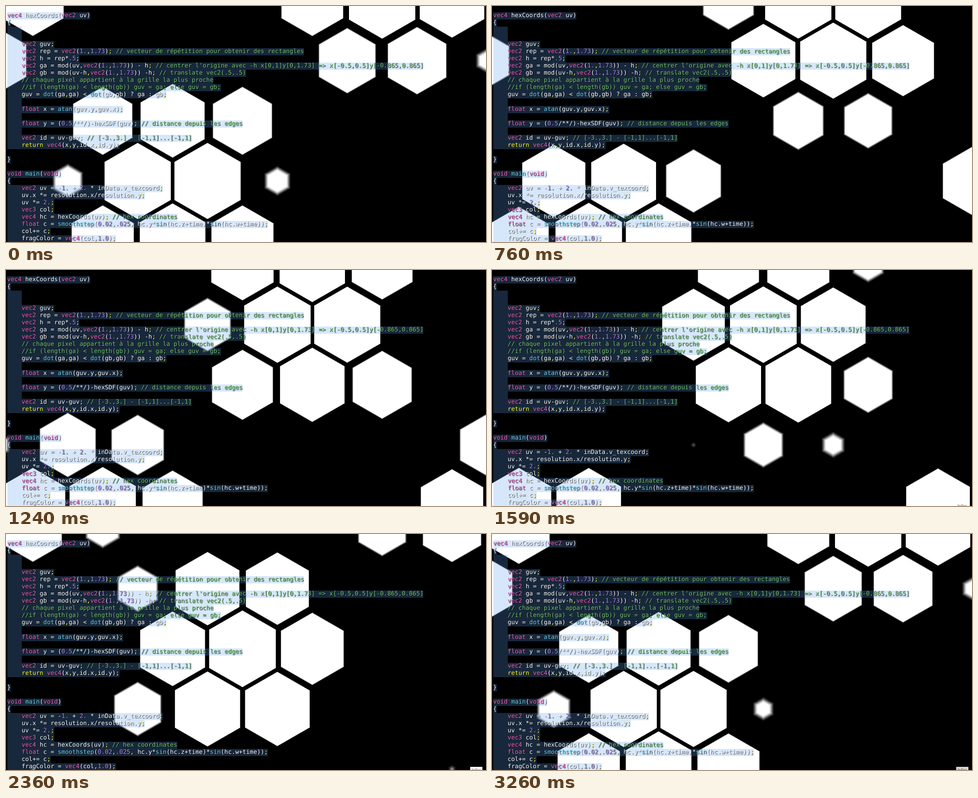
Animation of 1065x526 px, one loop 3330 ms. Source, as an HTML page with a canvas:

```html
<!DOCTYPE html>
<html lang="fr">
<head>
<meta charset="utf-8">
<style>
html, body { margin: 0; width: 100%; height: 100%; overflow: hidden; background: #000; }
canvas { position: absolute; left: 0; top: 0; }
pre {
  position: absolute; left: 2.5px; top: 13.9px; margin: 0;
  font: 13.35px/16.06px "DejaVu Sans Mono", monospace;
  text-rendering: geometricPrecision;
  color: #fff; text-shadow: 1px 1px 1px rgba(0, 0, 0, .85);
}
pre div { width: max-content; height: 16.06px; background: rgba(96, 160, 240, .25); }
.type { color: #f862bb; }
.func { color: #6ad4ec; }
.mark { color: #ffff40; }
.num { color: #b488ee; }
.note { color: #74c46c; }
#tip {
  position: absolute; left: 1030px; top: 519px; width: 27px; height: 7px;
  overflow: hidden; background: #fff; color: #555; text-align: center;
  font: 9px/14px "DejaVu Sans", sans-serif;
}
</style>
</head>
<body>
<canvas width="1065" height="526"></canvas>
<pre>
vec4 hexCoords(vec2 uv)
{
    
    
    vec2 guv;
    vec2 rep = vec2(1.,1.73); // vecteur de répétition pour obtenir des rectangles
    vec2 h = rep*.5;
    vec2 ga = mod(uv,vec2(1.,1.73)) - h; // centrer l'origine avec -h x[0,1]y[0,1.73] => x[-0.5,0.5]y[-0.865,0.865]
    vec2 gb = mod(uv-h,vec2(1.,1.73)) -h; // translate vec2(.5,.5)
    // chaque pixel appartient à la grille la plus proche
    //if (length(ga) &lt; length(gb)) guv = ga; else guv = gb;
    guv = dot(ga,ga) &lt; dot(gb,gb) ? ga : gb;
    
    float x = atan(guv.y,guv.x);
    
    float y = (0.5/**/)-hexSDF(guv); // distance depuis les edges
    
    vec2 id = uv-guv; // [-3.,3.] - [-1,1]...[-1,1]
    return vec4(x,y,id.x,id.y);

}

void main(void)
{
    vec2 uv = -1. + 2. * inData.v_texcoord;
    uv.x *= resolution.x/resolution.y;
    uv *= 2.;
    vec3 col;
    vec4 hc = hexCoords(uv); // hex coordinates
    float c = smoothstep(0.02,.025, hc.y*sin(hc.z+time)*sin(hc.w+time));
    col+= c;
    fragColor = vec4(col,1.0);</pre>
<div id="tip">Infos</div>
<script>
// Syntax colours: one block per line, one span per token
const pre = document.querySelector('pre'), tip = document.getElementById('tip');
const kinds = ['note', 'type', 'func', 'mark', 'num'];
const token = /(\/\/.*)|\b(vec\d|float|void)\b|\b(atan|dot|sin|smoothstep|main)\b|([;,]|return)|(\d+\.?\d*|\.\d+)/g;
pre.innerHTML = pre.textContent.trimEnd().split('\n').map(line =>
  '<div>' + line.replace(token, (text, ...groups) =>
    `<span class="${kinds[groups.findIndex(g => g)]}">${text}</span>`) + '</div>').join('');

// Hexagon field: cell and distance to the cell edge for every pixel
const W = 1065, H = 526, UNIT = 155, CX = 524.6, CY = 255.9, ROW = .865;
const ctx = document.querySelector('canvas').getContext('2d');
const image = ctx.createImageData(W, H);
const pixels = new Uint32Array(image.data.buffer);
const edge = new Float32Array(W * H), cell = new Uint16Array(W * H);
const cells = [], index = {};

function nearest(x, y, shift) {
  const col = Math.round(x - shift) + shift;
  const row = 2 * (Math.round(y / (2 * ROW) - shift) + shift);
  const dx = Math.abs(x - col), dy = Math.abs(y - row * ROW);
  return { col, row, dx, dy, d: dx * dx + dy * dy };
}

for (let p = 0; p < W * H; p++) {
  const x = (p % W + .5 - CX) / UNIT, y = (CY - Math.floor(p / W) - .5) / UNIT;
  const a = nearest(x, y, 0), b = nearest(x, y, .5), n = a.d < b.d ? a : b;
  const key = n.col + ',' + n.row;
  if (!(key in index)) index[key] = cells.push([n.col, n.row * ROW]) - 1;
  cell[p] = index[key];
  edge[p] = .5 - Math.max(n.dx, n.dx * .5005 + n.dy * .8657);
}

function drawHexes(t) {
  const gain = cells.map(([x, y]) => Math.sin(x + t) * Math.sin(y + t));
  for (let p = 0; p < W * H; p++) {
    const k = Math.min(1, Math.max(0, (edge[p] * gain[cell[p]] - .02) / .005));
    const v = Math.round(255 * k * k * (3 - 2 * k));
    pixels[p] = 0xff000000 | v * 0x10101;
  }
  ctx.putImageData(image, 0, 0);
}

// Shader clock, slightly uneven: [ms, phase]
const clock = [[0, -.567], [960, .365], [1590, .964], [2360, 1.684], [2850, 2.18], [3260, 2.582]];
function phase(ms) {
  let i = 1;
  while (i < clock.length - 1 && ms > clock[i][0]) i++;
  const [m0, p0] = clock[i - 1], [m1, p1] = clock[i];
  return p0 + (p1 - p0) * (ms - m0) / (m1 - m0);
}

// 48 steps of 70 ms, three of them 10 ms shorter
const start = i => 70 * i - 10 * ((i > 6) + (i > 13) + (i > 41));
let shown = -1;
function tick() {
  const ms = performance.now() % 3330;
  let step = 47;
  while (start(step) > ms) step--;
  if (step !== shown) {
    shown = step;
    drawHexes(phase(start(step)));
    tip.style.opacity = step < 22 ? 0 : step < 47 ? 1 : .85;
  }
  requestAnimationFrame(tick);
}
tick();
</script>
</body>
</html>
```
